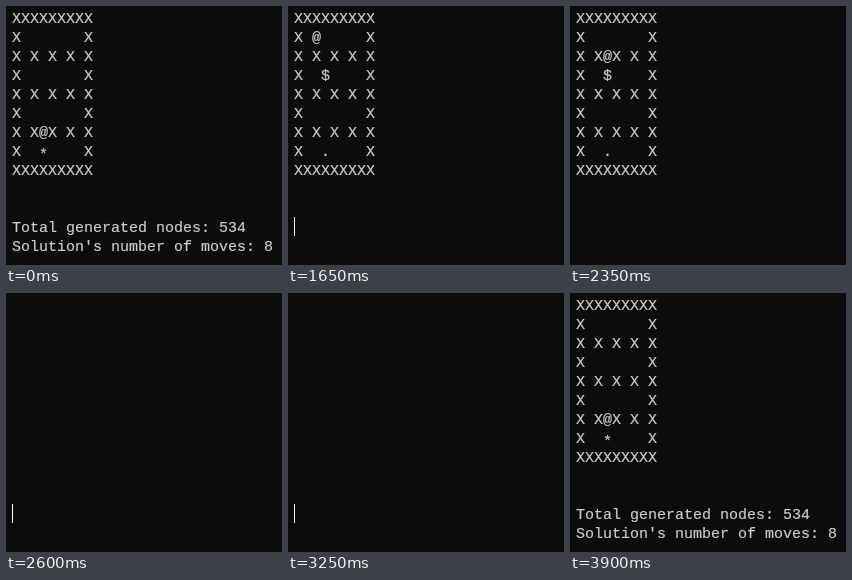
These frames come from a looping animation (276 px wide and 259 px high, 4.9 s). An HTML page:

```html
<!DOCTYPE html>
<html lang="en">
<head>
<meta charset="utf-8">
<title>Sokoban solver</title>
<style>
  html, body { margin: 0; width: 100%; height: 100%; overflow: hidden; background: #0c0c0c; }
  svg { display: block; width: 276px; height: 259px; }
  text {
    font: 15px "Liberation Mono", "DejaVu Sans Mono", monospace;
    white-space: pre;
    fill: #ccc;
    stroke: #ccc;
    stroke-width: .2px;
  }
</style>
</head>
<body>
<svg id="stage" viewBox="0 0 276 259">
  <rect width="276" height="259" fill="#0c0c0c"/>
  <rect y="258" width="276" height="1" fill="#1a0808"/>
  <g id="board"></g>
  <g id="report"></g>
  <rect id="cursor" x="6" y="211" width="1" height="19" fill="#fff"/>
</svg>
<script>
const LOOP = 4900;
const LEFT = 6, BASELINE = 17, CELL = 9, LINE = 19;
const GOAL = [7, 3];

// Player and crate positions as [row, column]
const STATES = [
  { player: [1, 1], crate: [3, 3] },
  { player: [1, 2], crate: [3, 3] },
  { player: [1, 3], crate: [3, 3] },
  { player: [2, 3], crate: [3, 3] },
  { player: [3, 3], crate: [4, 3] },
  { player: [4, 3], crate: [5, 3] },
  { player: [5, 3], crate: [6, 3] },
  { player: [6, 3], crate: [7, 3] }
];
const SOLVED = STATES.length - 1;
const BLANK = -1;

// [start in ms, value]
const SCREENS = [
  [0, SOLVED], [1400, 0], [1600, BLANK], [1650, 1], [1950, BLANK], [2000, 2],
  [2300, 3], [2600, BLANK], [2650, 4], [2950, 5], [3250, BLANK], [3300, 6],
  [3600, SOLVED]
];
const CURSOR = [
  [0, false], [1400, true], [1800, false], [1950, true], [2350, false],
  [2600, true], [2900, false], [2950, true], [3450, false], [3600, true],
  [3900, false]
];

const byId = id => document.getElementById(id);
const valueAt = (track, t) => track.filter(([start]) => start <= t).pop()[1];
const show = (node, on) => node.setAttribute("visibility", on ? "visible" : "hidden");

function addText(parent, row, content = "", col = 0) {
  const node = document.createElementNS("http://www.w3.org/2000/svg", "text");
  node.setAttribute("x", LEFT + col * CELL);
  node.setAttribute("y", BASELINE + row * LINE);
  node.textContent = content;
  parent.append(node);
  return node;
}

function wallRow(row) {
  if (row % 8 === 0) return "X".repeat(9);
  return row % 2 ? "X       X" : "X X X X X";
}

const board = byId("board"), report = byId("report"), cursor = byId("cursor");
const rows = Array.from({ length: 9 }, (_, row) => addText(board, row));
const star = addText(board, GOAL[0], "*", GOAL[1]);
star.setAttribute("dy", 3);
addText(report, 11, "Total generated nodes: 534");
addText(report, 12, "Solution's number of moves: 8");

function drawBoard(index) {
  const { player, crate } = STATES[index];
  const cells = rows.map((_, row) => [...wallRow(row)]);
  const put = ([row, col], glyph) => { cells[row][col] = glyph; };
  put(GOAL, ".");
  put(crate, index === SOLVED ? " " : "$");
  put(player, "@");
  rows.forEach((node, row) => { node.textContent = cells[row].join(""); });
}

let drawn = null;
function render(t) {
  const screen = valueAt(SCREENS, t);
  if (screen !== drawn && screen !== BLANK) drawBoard(screen);
  drawn = screen;
  show(board, screen !== BLANK);
  show(star, screen === SOLVED);
  show(report, t < 1400 || t >= 3900);
  show(cursor, valueAt(CURSOR, t));
}

const start = performance.now();
function tick() {
  render((performance.now() - start) % LOOP);
  requestAnimationFrame(tick);
}
tick();
</script>
</body>
</html>
```
